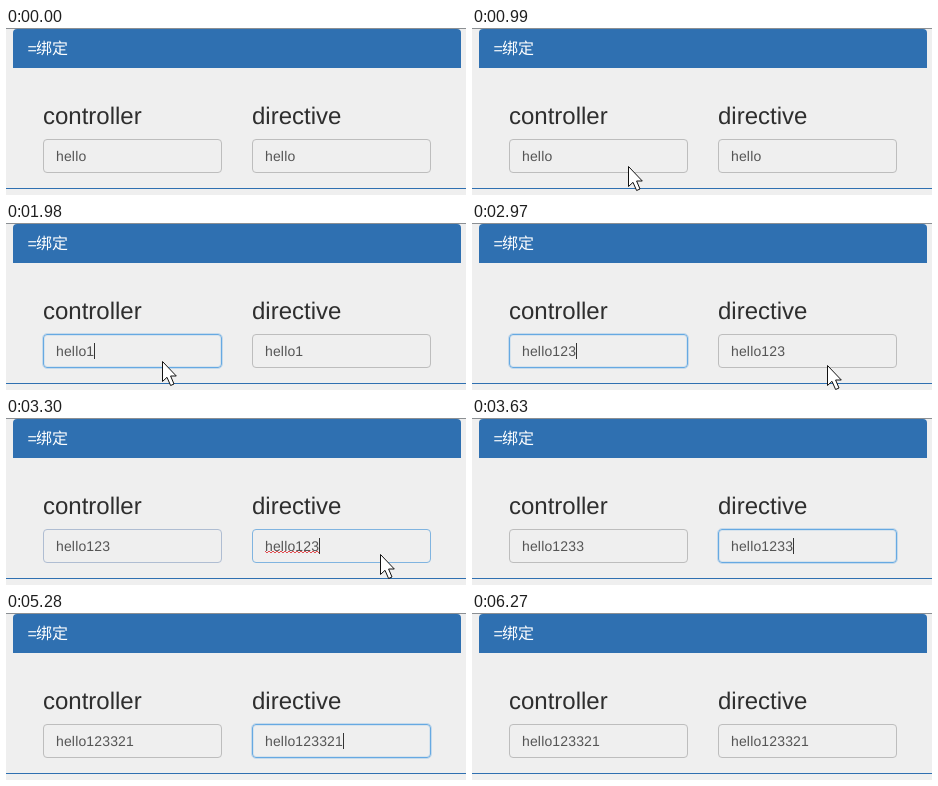
These frames come from a looping animation (460 by 167 pixels, 7260 ms). An HTML page:

```html
<!DOCTYPE html>
<html lang="zh">
<head>
<meta charset="utf-8">
<title>Two-way binding</title>
<style>
html, body { margin: 0; width: 100%; height: 100%; overflow: hidden; background: #efefef; }
svg { display: block; width: 460px; height: 167px; }
text { font-family: "Liberation Sans", Arial, sans-serif; text-rendering: geometricPrecision; }
.title { font-family: "Liberation Sans", "Noto Sans CJK SC", "Noto Sans CJK", sans-serif; font-size: 16px; font-weight: 300; fill: #fff; }
.head { font-size: 24px; fill: #2e2e2e; }
.value { font-size: 14px; letter-spacing: .15px; fill: #555; }
</style>
</head>
<body>
<svg viewBox="0 0 460 167">
  <rect width="460" height="167" fill="#efefef"/>
  <rect width="460" height="1" fill="#8b8f93"/>
  <path d="M7 40V5a4 4 0 0 1 4-4H451a4 4 0 0 1 4 4V40Z" fill="#2f70b1"/>
  <rect y="160" width="460" height="1" fill="#2f70b1"/>
  <text class="title" y="26"><tspan x="21.5">=</tspan><tspan x="30">绑定</tspan></text>
  <text class="head" x="37" y="96">controller</text>
  <text class="head" x="246" y="96">directive</text>
  <g id="fields"></g>
  <path id="mouse" d="M.5 .5V20.5L5 16.3 8.6 24.5 12 23 8.6 15H14.3Z" fill="#fff" stroke="#111"/>
</svg>
<script>
const LOOP = 7260;
const NS = "http://www.w3.org/2000/svg";
const IDLE = "#bdbdbd", FOCUS = "#66a9e2";

function add(parent, tag, attrs) {
  const el = document.createElementNS(NS, tag);
  for (const k in attrs) el.setAttribute(k, attrs[k]);
  return parent.appendChild(el);
}

const show = (el, on) => el.setAttribute("visibility", on ? "visible" : "hidden");

// last entry of [time, value] pairs that has started
const at = (track, t) => track.filter(k => k[0] <= t).pop()[1];

function squiggle(x, y, w) {
  let d = `M${x} ${y}`;
  for (let i = 2; i <= w; i += 2) d += `L${x + i} ${y + (i % 4 ? 2 : 0)}`;
  return d;
}

function field(x) {
  const g = add(document.getElementById("fields"), "g", {});
  const box = { fill: "none", y: 110.5, height: 35, rx: 4.5 };
  const glow = add(g, "rect", { ...box, x: x - .5, width: 180, stroke: FOCUS, "stroke-opacity": .3 });
  const inner = add(g, "rect", { ...box, x: x + 1.5, y: 112.5, width: 176, height: 31, rx: 2.5, stroke: FOCUS, "stroke-opacity": .18 });
  const border = add(g, "rect", { ...box, x: x + .5, y: 111.5, width: 178, height: 33, rx: 3.5 });
  const text = add(g, "text", { class: "value", x: x + 13, y: 133 });
  const wave = add(g, "path", { d: squiggle(x + 13, 133, 54), fill: "none", stroke: "#e0393e", "stroke-width": .9 });
  const caret = add(g, "rect", { y: 120, width: 1, height: 16, fill: "#333" });
  return (value, color, focused, blink, misspelt) => {
    text.textContent = value;
    border.setAttribute("stroke", color);
    show(glow, focused);
    show(inner, focused);
    show(wave, misspelt);
    caret.setAttribute("x", x + 13 + 30 + 8 * (value.length - 5));
    show(caret, blink);
  };
}

const left = field(37), right = field(246);
const mouse = document.getElementById("mouse");

const typed = [[0, "hello"], [1980, "hello1"], [2640, "hello123"],
  [3630, "hello1233"], [3960, "hello12332"], [4290, "hello123321"]];
const pointer = [[0, null], [660, [237, 136]], [990, [156, 138]],
  [2970, [355, 142]], [3300, [374, 136]], [3630, null]];
const leftEdge = [[0, IDLE], [1320, FOCUS], [3300, "#afbdd2"], [3630, IDLE]];
const rightEdge = [[0, IDLE], [3300, "#80b4e0"], [3630, FOCUS], [6270, IDLE]];
const leftCaret = [[0, false], [1320, true], [1650, false], [1980, true], [3300, false]];
const rightCaret = [[0, false], [3300, true], [4950, false], [5280, true], [5940, false]];

function draw(t) {
  const value = at(typed, t), pos = at(pointer, t);
  left(value, at(leftEdge, t), t >= 1320 && t < 3300, at(leftCaret, t), false);
  right(value, at(rightEdge, t), t >= 3630 && t < 6270, at(rightCaret, t), t >= 3300 && t < 3630);
  show(mouse, pos);
  if (pos) mouse.setAttribute("transform", `translate(${pos})`);
}

const start = performance.now();
function tick() {
  draw((performance.now() - start) % LOOP);
  requestAnimationFrame(tick);
}
tick();
</script>
</body>
</html>
```
